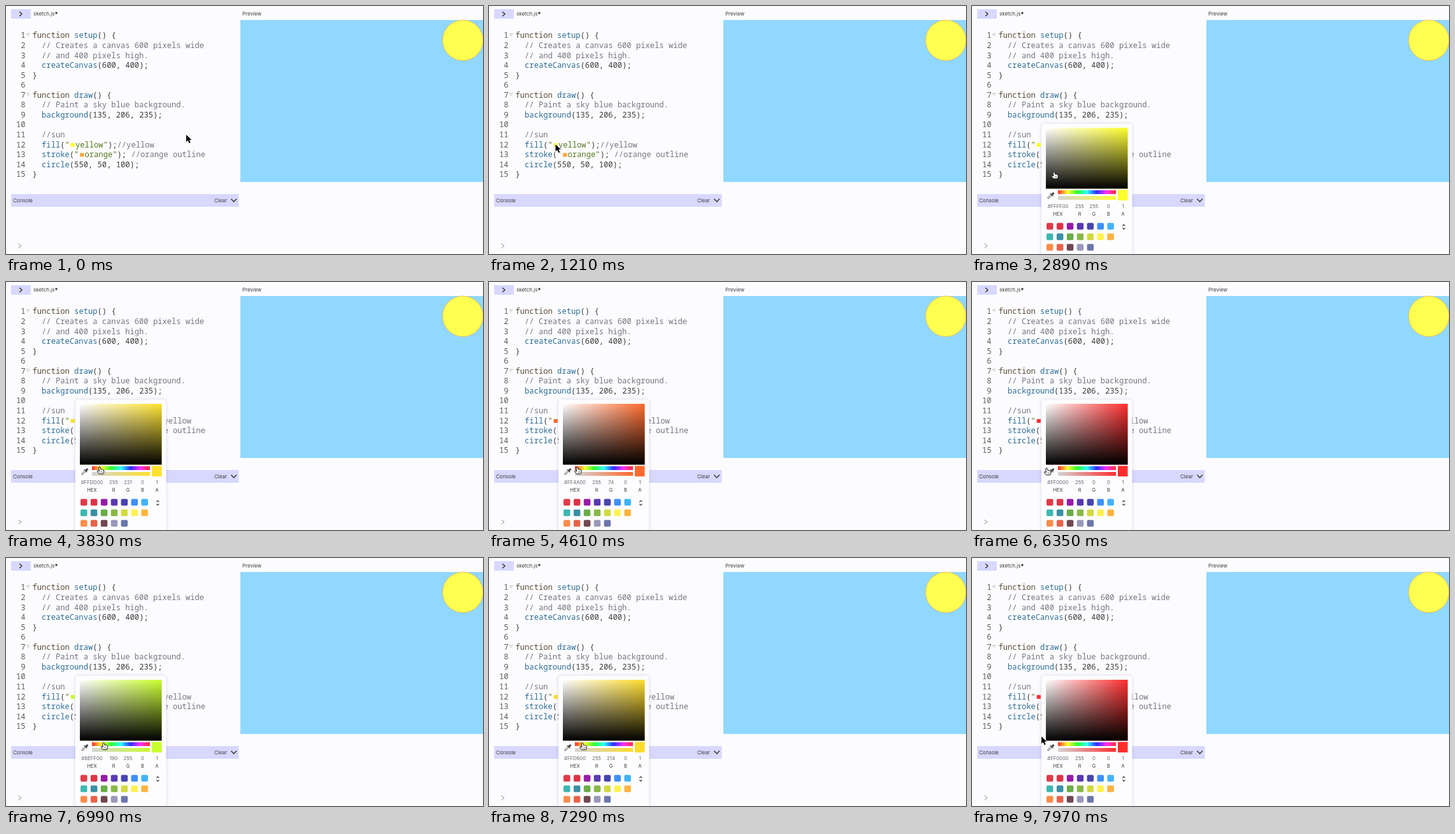
An HTML page with a canvas that plays this animation: 749 px wide and 389 px high, repeating every 8000 ms.

```html
<!DOCTYPE html>
<html lang="en">
<head>
<meta charset="utf-8">
<title>Colour picker in a code editor</title>
<style>
  html, body { margin: 0; width: 100%; height: 100%; overflow: hidden; background: #fcfcff; }
  canvas { display: block; }
</style>
</head>
<body>
<canvas id="stage" width="749" height="389"></canvas>
<script>
const ctx = document.getElementById('stage').getContext('2d');
const LOOP = 8000, PICKER_OPENS = 1880, DRAG_STARTS = 3530;
const CHAR = 7.29, CODE_X = 41.5, CODE_Y = 50.4, LINE = 15.56;
const HUE_X = 135, HUE_W = 91;
const MONO = '12.15px "Noto Sans Mono", "DejaVu Sans Mono", monospace';
const UI = 'Inter, "Open Sans", sans-serif';
const LAVENDER = '#d8d8ff', INK = '#3c3c3c';

// Pointer tip: time, x, y
const path = [
  [0, 283, 202], [30, 283, 202], [670, 107, 221], [810, 107, 221],
  [1210, 104.5, 217], [1880, 104.5, 217], [2660, 126, 254], [2890, 128.5, 260],
  [3460, 149, 290], [3530, 149, 290], [4300, 143, 290], [4610, 138.2, 290],
  [5140, 133.5, 289], [5610, 130.5, 288], [5980, 117, 291], [6200, 112, 292],
  [6820, 146, 290], [6990, 152.83, 289.5], [7200, 150, 290], [7660, 116, 288],
  [7970, 109, 280], [8000, 109, 280]
];

const codeLines = fillColor => [
  'function setup() {',
  '  // Creates a canvas 600 pixels wide',
  '  // and 400 pixels high.',
  '  createCanvas(600, 400);',
  '}',
  '',
  'function draw() {',
  '  // Paint a sky blue background.',
  '  background(135, 206, 235);',
  '',
  '  //sun',
  `  fill("${fillColor}");//yellow`,
  '  stroke("orange"); //orange outline',
  '  circle(550, 50, 100);',
  '}'
];

const palette = [
  ['#e03a48', '#dc3348', '#961ba8', '#5a38b2', '#4644ae', '#3e90fa', '#42b2fa'],
  ['#3cb8b0', '#3b90a4', '#6aac48', '#8ab848', '#d2da40', '#fff250', '#ffb440'],
  ['#ff8c48', '#e8624a', '#704650', '#9a98ba', '#6c76aa']
];

const clamp = (v, lo, hi) => Math.min(hi, Math.max(lo, v));

function pointerAt(t) {
  const i = Math.max(1, path.findIndex(key => key[0] > t));
  const [t0, x0, y0] = path[i - 1], [t1, x1, y1] = path[i];
  const u = (t - t0) / (t1 - t0), e = u * u * (3 - 2 * u);
  return { x: x0 + (x1 - x0) * e, y: y0 + (y1 - y0) * e };
}

function hueToRgb(h) {
  return [0, 120, 240].map(center => {
    const d = Math.abs((h - center + 540) % 360 - 180);
    return Math.round(255 * clamp(2 - d / 60, 0, 1));
  });
}

const soft = (rgb, alpha = 1) => `rgba(${rgb.map(c => Math.round(45 + c * 0.82))},${alpha})`;

function colorAt(t, x) {
  if (t < DRAG_STARTS) return [255, 255, 0];
  return hueToRgb(clamp((x + 1.2 - HUE_X) / HUE_W, 0, 0.999) * 360);
}

function rect(x, y, w, h, color) {
  ctx.fillStyle = color;
  ctx.fillRect(x, y, w, h);
}

function roundRect(x, y, w, h, r, color) {
  ctx.beginPath();
  ctx.roundRect(x, y, w, h, r);
  ctx.fillStyle = color;
  ctx.fill();
}

function text(str, x, y, font, color, align = 'left') {
  ctx.font = font;
  ctx.fillStyle = color;
  ctx.textAlign = align;
  ctx.fillText(str, x, y);
}

function line(points, color, width) {
  ctx.beginPath();
  points.forEach(p => ctx.lineTo(...p));
  ctx.strokeStyle = color;
  ctx.lineWidth = width;
  ctx.stroke();
}

function gradient(x0, y0, x1, y1, colors) {
  const g = ctx.createLinearGradient(x0, y0, x1, y1);
  colors.forEach((c, i) => g.addColorStop(i / (colors.length - 1), c));
  return g;
}

function drawChrome() {
  rect(0, 0, 749, 389, '#fcfcff');
  rect(8, 5, 31, 15, LAVENDER);
  line([[21, 9], [25, 12.5], [21, 16]], '#333', 1.4);
  text('sketch.js', 43, 15, `8px ${UI}`, INK);
  ctx.beginPath();
  ctx.arc(79, 11, 1.7, 0, 7);
  ctx.fillStyle = INK;
  ctx.fill();
  text('Preview', 371, 15, `8px ${UI}`, INK);

  rect(8, 295, 357.5, 20, LAVENDER);
  text('Console', 11, 307.8, `8px ${UI}`, INK);
  text('Clear', 327, 307.8, `8px ${UI}`, INK);
  line([[353.5, 302.5], [357.7, 307], [362, 302.5]], '#333', 1.5);
  line([[19.5, 373], [24, 376.3], [19.5, 379.5]], '#888', 1);
}

function drawPreview() {
  rect(368, 22, 381, 254, '#90d8ff');
  ctx.beginPath();
  ctx.arc(717.3, 53.8, 31.8, 0, 7);
  ctx.fillStyle = '#ffff52';
  ctx.fill();
  ctx.strokeStyle = '#f4b04c';
  ctx.lineWidth = 0.8;
  ctx.stroke();
}

function tokenColor(token, rest) {
  if (token.startsWith('//')) return '#74747c';
  if (token[0] === '"') return '#55781c';
  if (token === 'function') return '#584a34';
  if (/^[a-z]/i.test(token) && rest[0] === '(') return '#2c6c94';
  return INK;
}

function drawCodeLine(str, y, swatch) {
  let x = CODE_X;
  for (const { 0: token, index } of str.matchAll(/\/\/.*|"[^"]*"|\w+|\s+|[^\w\s"]/g)) {
    const color = tokenColor(token, str.slice(index + token.length));
    if (token[0] === '"') {
      text('"', x, y, MONO, color);
      x += CHAR;
      rect(x + 1.8, y - 6.6, 6.2, 6, swatch);
      x += 9.1;
      text(token.slice(1), x, y, MONO, color);
      x += (token.length - 1) * CHAR;
    } else {
      text(token, x, y, MONO, color);
      x += token.length * CHAR;
    }
  }
}

function drawCode(t, rgb) {
  const name = t < DRAG_STARTS ? 'yellow' : `rgb(${rgb})`;
  codeLines(name).forEach((str, i) => {
    const y = CODE_Y + i * LINE;
    text(i + 1, 30.5, y, MONO, '#5c5c58', 'right');
    drawCodeLine(str, y, str.includes('fill') ? soft(rgb) : '#ffa63c');
    if (str.startsWith('function'))
      line([[32.2, y - 7], [37, y - 7], [34.6, y - 3], [32.2, y - 7]], '#c4c4b8', 0.9);
  });
}

function drawSliders(rgb) {
  const hues = [0, 60, 120, 180, 240, 300, 360].map(h => soft(hueToRgb(h)));
  rect(HUE_X, 289, HUE_W, 6, gradient(HUE_X, 0, HUE_X + HUE_W, 0, hues));

  rect(HUE_X, 298, HUE_W, 6, '#fff');
  for (let i = 0; i < 60; i++)
    rect(HUE_X + (i >> 1) * 3, 298 + ((i + (i >> 1)) % 2) * 3, 3, 3, '#d4d4d4');
  rect(HUE_X, 298, HUE_W, 6, gradient(HUE_X, 0, HUE_X + HUE_W, 0, [soft(rgb, 0), soft(rgb)]));
  rect(229, 288.5, 15.5, 16.5, soft(rgb));

  line([[119, 302], [125, 296]], '#555', 2.6);
  line([[119.5, 301.5], [124.5, 296.5]], '#fff', 1.1);
  line([[123, 294], [127.3, 298.3]], '#444', 1.5);
  line([[125.5, 296], [128.5, 293]], '#444', 3);
}

function drawValues(rgb) {
  const hex = '#' + rgb.map(c => c.toString(16).padStart(2, '0')).join('').toUpperCase();
  const labels = ['HEX', 'R', 'G', 'B', 'A'];
  const centers = [135, 169, 191.5, 214.3, 237];
  [hex, ...rgb, 1].forEach((value, i) => {
    text(value, centers[i], 316.8, `7.7px ${UI}`, '#66666c', 'center');
    text(labels[i], centers[i], 329, `7.3px ${UI}`, '#333', 'center');
  });
  line([[236.3, 345], [238.3, 342.8], [240.3, 345]], '#444', 1.2);
  line([[236.3, 348], [238.3, 350.2], [240.3, 348]], '#444', 1.2);
}

function drawPicker(rgb) {
  ctx.save();
  ctx.shadowColor = 'rgba(90,90,140,.28)';
  ctx.shadowBlur = 5;
  roundRect(109, 184.5, 142.5, 220, 5, '#fdfdff');
  ctx.restore();

  const [x, y, w, h] = [116, 191, 128.5, 95.5];
  rect(x, y, w, h, soft(rgb));
  rect(x, y, w, h, gradient(x, 0, x + w, 0, ['#fff', 'rgba(255,255,255,0)']));
  rect(x, y, w, h, gradient(0, y, 0, y + h, ['rgba(0,0,0,0)', '#000']));

  drawSliders(rgb);
  drawValues(rgb);
  palette.forEach((row, j) => row.forEach((color, i) =>
    roundRect(117 + i * 15.9, 340.3 + j * 16.5, 10.5, 10.5, 2, color)));
}

function drawArrow({ x, y }) {
  ctx.save();
  ctx.translate(x, y);
  const outline = new Path2D('M0 0V11.2L2.6 8.8L4.6 13.2L6.7 12.3L4.8 8H8.3Z');
  ctx.strokeStyle = '#fff';
  ctx.lineWidth = 1.6;
  ctx.stroke(outline);
  ctx.fillStyle = '#000';
  ctx.fill(outline);
  ctx.restore();
}

function drawHand({ x, y }) {
  ctx.save();
  ctx.translate(x, y);
  const outline = new Path2D('M-1.3 .8Q0-.7 1.2.8L2 4Q3 3 4 4.2Q5 3.6 5.6 4.8Q6.8 4.6 6.8 6V8.3L5.6 11H-.5L-3.6 7.2Q-4 5.6-2.4 5.9L-.6 7Z');
  ctx.fillStyle = '#fff';
  ctx.fill(outline);
  ctx.strokeStyle = '#111';
  ctx.lineWidth = 1;
  ctx.lineJoin = 'round';
  ctx.stroke(outline);
  line([[2.2, 6.8], [2.2, 9.2]], '#111', 0.6);
  line([[4.2, 6.8], [4.2, 9.2]], '#111', 0.6);
  ctx.restore();
}

function draw() {
  const t = performance.now() % LOOP;
  const pointer = pointerAt(t);
  const rgb = colorAt(t, pointer.x);
  const open = t >= PICKER_OPENS;
  drawChrome();
  drawPreview();
  drawCode(t, rgb);
  if (open) drawPicker(rgb);
  if (open && pointer.x > 110) drawHand(pointer);
  else drawArrow(pointer);
  requestAnimationFrame(draw);
}
draw();
</script>
</body>
</html>
```
